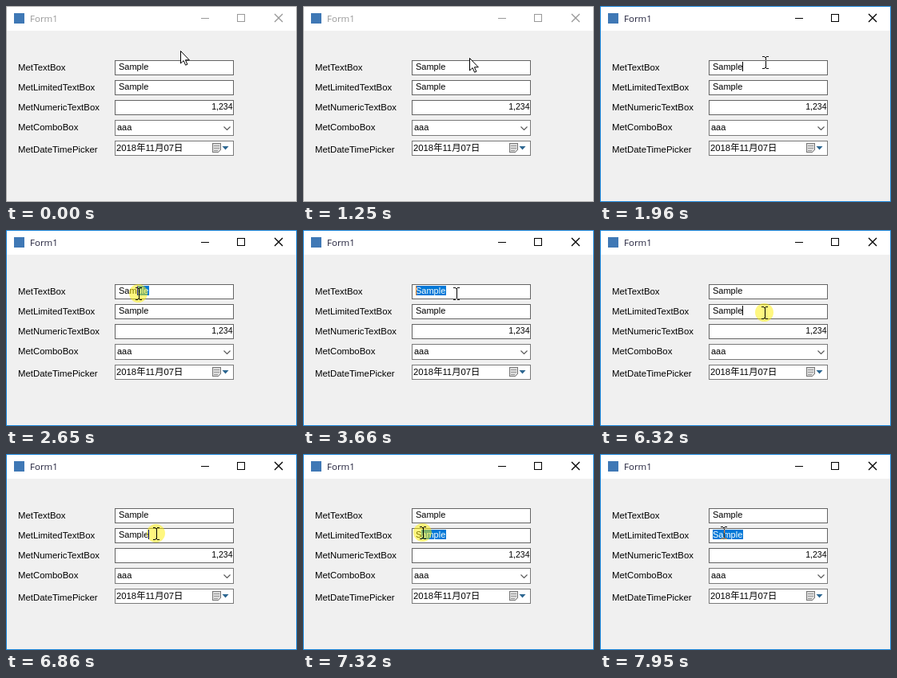
Recreate the animation shown at these times as an HTML page. Size 364 by 246 pixels, loop 8000 ms.

```html
<!DOCTYPE html>
<html lang="en">
<head>
<meta charset="utf-8">
<title>Form1</title>
<style>
  html, body { margin: 0; width: 100%; height: 100%; overflow: hidden; background: #f0f0f0; }
  svg { display: block; shape-rendering: crispEdges; }
  text { font: 11px "Liberation Sans", "Noto Sans CJK JP", "Noto Sans CJK", sans-serif; fill: #000; white-space: pre; }
  .labels text { font-size: 11.4px; }
  .title { font: 11.5px "Open Sans", "Noto Sans", sans-serif; fill: #999; }
  .buttons { fill: none; stroke: #999; }
  .frame { fill: none; stroke: #aaa; }
  .active .title { fill: #22223c; }
  .active .buttons { stroke: #000; }
  .active .frame { stroke: #1883d7; }
  .box { fill: #fff; stroke: #646464; }
  .picker { fill: #fff; stroke: #7a7a7a; }
  .smooth { shape-rendering: geometricPrecision; }
  #sel text { fill: #fff; }
  .invert { mix-blend-mode: difference; fill: #fff; }
  .solid { fill: #000; }
</style>
</head>
<body>
<svg id="stage" width="364" height="246" viewBox="0 0 364 246">
  <rect width="364" height="246" fill="#f0f0f0"/>
  <rect width="364" height="31" fill="#fff"/>
  <rect x="10" y="9" width="13" height="13" fill="#3f78b5"/>
  <text class="title" x="30" y="20">Form1</text>
  <g class="buttons">
    <path d="M244 15.5h10M289.5 10.5h9v9h-9z"/>
    <path class="smooth" d="M336 10l10 10m0-10l-10 10" stroke-width="1.4"/>
  </g>
  <rect class="frame" x=".5" y=".5" width="363" height="245"/>

  <g class="labels">
    <text x="15" y="81">MetTextBox</text>
    <text x="15" y="106">MetLimitedTextBox</text>
    <text x="15" y="131">MetNumericTextBox</text>
    <text x="15" y="156">MetComboBox</text>
    <text x="15" y="184">MetDateTimePicker</text>
  </g>

  <rect class="box" x="136.5" y="68.5" width="148" height="18"/>
  <rect class="box" x="136.5" y="93.5" width="148" height="18"/>
  <rect class="box" x="136.5" y="118.5" width="148" height="18"/>
  <rect class="picker" x="136.5" y="143.5" width="148" height="19"/>
  <rect class="picker" x="136.5" y="169.5" width="148" height="18"/>
  <text id="sample" x="141" y="80">Sample</text>
  <text x="141" y="105">Sample</text>
  <text x="283.5" y="130" text-anchor="end" style="font-size: 10.5px">1,234</text>
  <text x="139" y="156">aaa</text>
  <text x="138" y="182" style="font-size: 11.3px">2018年11月07日</text>

  <path class="smooth" d="M272.500 151.500l4 4 4-4" fill="none" stroke="#555" stroke-width="1.100"/>
  <path d="M258.500 172.500h10v8l-3 3h-7z" fill="#dcdcdc" stroke="#777"/>
  <path d="M260 175.500h7M260 178.500h7M260 181.500h5" stroke="#999"/>
  <path class="smooth" d="M270.500 176h8l-4 4.500z" fill="#2d6791"/>

  <svg id="sel" height="12">
    <rect x="136" y="60" width="60" height="60" fill="#0078d7"/>
    <text x="141">Sample</text>
  </svg>
  <circle id="press" class="smooth" r="11.5" fill="#fff000" fill-opacity=".5"/>
  <rect id="caret" class="invert" width="1" height="12"/>
  <path id="beam" d="M-4-8h3v1h-3zM1-8h3v1h-3zM-1-7h2v1h-2zM0-6h1v12h-1zM-1 6h2v1h-2zM-4 7h3v1h-3zM1 7h3v1h-3z"/>
  <path id="arrow" class="smooth" d="M.5.5v15.500l3.600-3.400 2.500 5.600 2.300-1-2.500-5.400h4.900z" fill="#fff" stroke="#000"/>
</svg>
<script>
const LOOP = 8000, FRAME = 77.87, BLINK = 640;
const $ = id => document.getElementById(id);

const home = [218, 56];
// Pointer moves: start, end, x, y
const moves = [
  [1090, 1410, 205, 68], [1800, 1960, 207, 71], [1960, 2260, 206, 81],
  [2352, 3210, 135, 80], [3300, 3910, 204, 80], [5690, 6200, 206, 104],
  [6480, 6700, 204, 100], [6720, 7710, 140, 99], [7780, 7950, 155, 99]
];
// The button goes down and up; the selection stays until end
const clicks = [
  { down: 1410, up: 1660, end: 1660, y: 70 },
  { down: 2260, up: 3360, end: 4760, y: 70 },
  { down: 6240, up: 7880, end: LOOP, y: 95 }
];
const wakes = [...clicks.map(c => c.down), 3650, 4760];

const sample = $("sample");
const edges = [...sample.textContent].map((_, i) => Math.round(sample.getStartPositionOfChar(i).x));
const first = edges[0], end = 179;
edges.push(end);

const easeOut = k => 1 - (1 - k) ** 2;
const show = (el, on) => el.setAttribute("visibility", on ? "visible" : "hidden");
const set = (el, attrs) => { for (const k in attrs) el.setAttribute(k, attrs[k]); };

function pointer(t) {
  let [x, y] = home;
  for (const [a, b, toX, toY] of moves) {
    const k = easeOut(Math.min(1, Math.max(0, (t - a) / (b - a))));
    x += (toX - x) * k;
    y += (toY - y) * k;
  }
  return [Math.round(x), Math.round(y)];
}

function selectionLeft(t, x) {
  const click = clicks.find(c => t >= c.down && t < c.end);
  if (!click) return end;
  if (t >= click.up) return first;
  return edges.reduce((a, b) => Math.abs(b - x) < Math.abs(a - x) ? b : a);
}

function draw(t) {
  const [x, y] = pointer(t);
  const pressed = clicks.some(c => t >= c.down && t < c.up);
  const field = clicks.findLast(c => t >= c.down) || clicks[0];
  const left = selectionLeft(t, x), width = end - left;
  const inField = y >= 68;

  $("stage").classList.toggle("active", t >= clicks[0].down);
  show($("sel"), width > 0);
  if (width > 0) {
    set($("sel"), { x: left, y: field.y, width, viewBox: `${left} ${field.y} ${width} 12` });
    set($("sel").lastElementChild, { y: field.y + 10 });
  }
  show($("caret"), wakes.some(w => t >= w && t < w + BLINK));
  set($("caret"), { x: Math.min(left, end - 1), y: field.y });
  show($("press"), pressed);
  set($("press"), { cx: x - .5, cy: y - .5 });
  show($("beam"), inField);
  show($("arrow"), !inField);
  set($("beam"), { class: pressed ? "solid" : "invert", transform: `translate(${x} ${y})` });
  set($("arrow"), { transform: `translate(${x} ${y})` });
}

const start = performance.now();
function loop() {
  const now = Math.max(0, performance.now() - start) % LOOP;
  draw(Math.floor(now / FRAME) * FRAME);
  requestAnimationFrame(loop);
}
loop();
</script>
</body>
</html>
```
